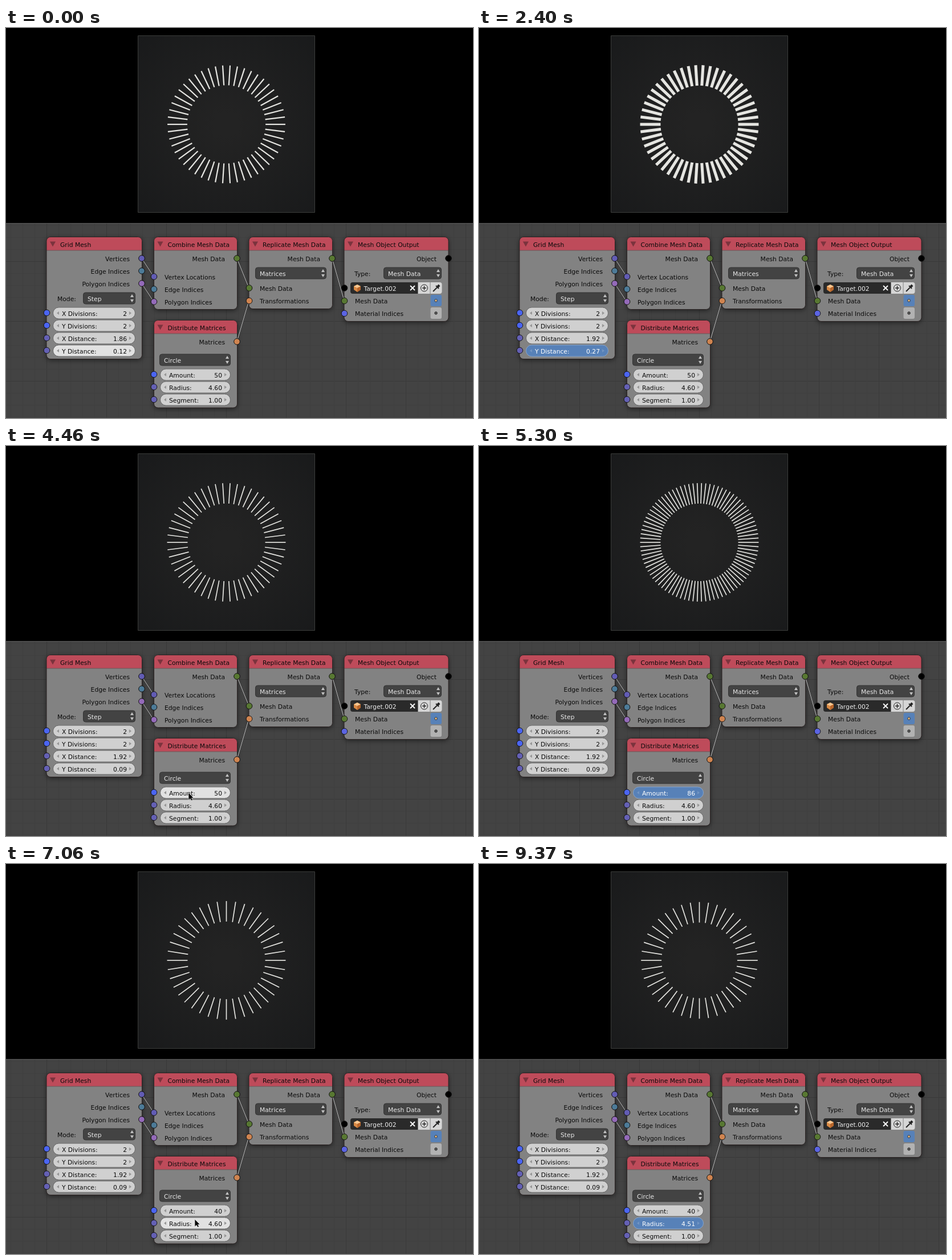
Write an HTML page with a canvas that moves like this. It is 819 by 684 pixels and loops after 9.42 s.

```html
<!DOCTYPE html>
<html lang="en">
<head>
<meta charset="utf-8">
<title>Radial mesh nodes</title>
<style>
html, body { margin: 0; width: 819px; height: 684px; overflow: hidden; background: #000; }
canvas { display: block; }
</style>
</head>
<body>
<canvas id="stage" width="819" height="684"></canvas>
<script>
const ctx = document.getElementById('stage').getContext('2d');
const LOOP = 9420, UNIT = 18.7, CX = 386.5, CY = 169;

const SOCKET = {
  vector: '#625cb4', edge: '#4d7b98', polygon: '#946ab9', mesh: '#587832',
  matrix: '#cf8450', integer: '#4b65f2', float: '#6460b4', object: '#000', indices: '#5b64e2'
};

// Keyframes: [time, value...]
const xDistance = [[340, 1.86], [600, 1.2], [1290, 3.4], [1590, 2.34], [1900, 1.92]];
const yDistance = [[2270, .12], [2700, .62], [3050, .38], [3520, .1], [3680, .1], [3730, .09]];
const amount = [[4640, 50], [4920, 72], [5150, 87], [5300, 86], [6010, 42], [6350, 40]];
const radius = [[7480, 4.6], [7920, 6.35], [8440, 5.1], [8900, 3.8], [9370, 4.51]];
const pointer = [[60, 150, 556], [110, 150, 541], [2030, 150, 541], [2220, 150, 560], [3980, 150, 560],
  [4250, 290, 623], [4430, 320, 608], [6600, 320, 608], [7040, 331, 623]];

// Which field is under the pointer or being dragged from a given time on
const focus = [[0, 'y', 'hover'], [60, '', ''], [110, 'x', 'hover'], [340, 'x', 'drag'],
  [2030, 'x', 'hover'], [2130, 'y', 'hover'], [2270, 'y', 'drag'], [3980, 'y', 'hover'],
  [4120, '', ''], [4230, 'radius', 'hover'], [4360, 'amount', 'hover'], [4620, 'amount', 'drag'],
  [6600, 'amount', 'hover'], [6950, 'radius', 'hover'], [7140, 'radius', 'drag']];

function sample(keys, t, column = 1) {
  const next = keys.findIndex(key => key[0] > t);
  if (next === 0) return keys[0][column];
  if (next < 0) return keys[keys.length - 1][column];
  const a = keys[next - 1], b = keys[next];
  return a[column] + (b[column] - a[column]) * (t - a[0]) / (b[0] - a[0]);
}

function box(x, y, w, h, r, fill, stroke) {
  ctx.beginPath();
  ctx.roundRect(x, y, w, h, r);
  ctx.fillStyle = fill;
  ctx.fill();
  if (stroke) { ctx.strokeStyle = stroke; ctx.lineWidth = 1; ctx.stroke(); }
}

function poly(points, fill, stroke) {
  ctx.beginPath();
  for (let i = 0; i < points.length; i += 2) ctx.lineTo(points[i], points[i + 1]);
  ctx.closePath();
  ctx.fillStyle = fill;
  ctx.fill();
  if (stroke) { ctx.strokeStyle = stroke; ctx.lineWidth = 1; ctx.stroke(); }
}

function line(x1, y1, x2, y2, color, width = 1) {
  ctx.beginPath();
  ctx.moveTo(x1, y1);
  ctx.lineTo(x2, y2);
  ctx.strokeStyle = color;
  ctx.lineWidth = width;
  ctx.stroke();
}

function dot(x, y, r, fill, stroke) {
  ctx.beginPath();
  ctx.arc(x, y, r, 0, 7);
  if (fill) { ctx.fillStyle = fill; ctx.fill(); }
  if (stroke) { ctx.strokeStyle = stroke; ctx.lineWidth = 1; ctx.stroke(); }
}

function label(str, x, y, color = '#0a0a0a', align = 'left') {
  ctx.font = '10.75px "DejaVu Sans", sans-serif';
  ctx.textAlign = align;
  ctx.fillStyle = color;
  ctx.fillText(str, x, y + 4.5);
}

const socket = (x, y, type) => dot(x, y, 5.3, SOCKET[type], '#111');

function output(str, x, y, type) {
  label(str, x - 21, y, '#0a0a0a', 'right');
  socket(x, y, type);
}

function input(str, x, y, type) {
  label(str, x + 18.5, y);
  socket(x, y, type);
}

function node(title, x, y, w, h) {
  ctx.save();
  ctx.shadowColor = 'rgba(0,0,0,.55)';
  ctx.shadowBlur = 8;
  ctx.shadowOffsetY = 2;
  box(x, y, w, h, 7, '#828282');
  ctx.restore();
  box(x, y, w, 23.5, [7, 7, 0, 0], '#be4b5a');
  line(x, y + 23.5, x + w, y + 23.5, '#6f5558');
  ctx.beginPath();
  ctx.roundRect(x, y, w, h, 7);
  ctx.strokeStyle = '#2c2424';
  ctx.lineWidth = 1;
  ctx.stroke();
  poly([x + 6, y + 8, x + 16, y + 8, x + 11, y + 17], '#7b333d');
  label(title, x + 24, y + 12.5);
}

function dropdown(str, x, y, w) {
  box(x + .5, y - 10, w - 1, 20, 4, '#434343', '#333');
  label(str, x + 8, y, '#e8e8e8');
  const a = x + w - 6;
  poly([a - 3, y - 2, a + 3, y - 2, a, y - 7], '#c4c4c4');
  poly([a - 3, y + 2, a + 3, y + 2, a, y + 7], '#c4c4c4');
}

function field(str, value, x, y, w, type, mode) {
  const drag = mode === 'drag';
  const fill = drag ? '#5781b8' : mode === 'hover' ? '#e2e2e2' : '#d0d0d0';
  const ink = drag ? '#fff' : '#0a0a0a', arrow = drag ? '#7395c2' : '#969696';
  box(x + .5, y - 10, w - 1, 20, 10, fill, drag ? '#86a5cd' : '#686868');
  poly([x + 11, y - 3, x + 11, y + 3, x + 7, y], arrow);
  poly([x + w - 11, y - 3, x + w - 11, y + 3, x + w - 7, y], arrow);
  label(str + ':', x + 16, y, ink);
  label(value, x + w - 15, y, ink, 'right');
  socket(x - 10.5, y - .5, type);
}

function preview(count, r, length, width) {
  const shade = ctx.createRadialGradient(CX, CY, 20, CX, CY, 220);
  shade.addColorStop(0, '#232323');
  shade.addColorStop(1, '#191a1b');
  box(231.5, 13.5, 310, 310, 0, shade, '#3b3d3b');
  ctx.fillStyle = '#e5e5e1';
  for (let i = 0; i < count; i++) {
    ctx.save();
    ctx.translate(CX, CY);
    ctx.rotate(i / count * Math.PI * 2);
    ctx.fillRect((r - length / 2) * UNIT, -width * UNIT / 2, length * UNIT, width * UNIT);
    ctx.restore();
  }
}

function editor() {
  ctx.fillStyle = '#434343';
  ctx.fillRect(0, 342, 819, 342);
  for (let i = 0; i < 40; i++) {
    const color = i % 5 === 3 ? '#393939' : '#3f3f3f';
    line(i * 21 + 8.5, 342, i * 21 + 8.5, 684, color);
    if (i < 17) line(0, i * 21 + 346.5, 819, i * 21 + 346.5, color);
  }
  line(0, 342.5, 819, 342.5, '#585858');
}

function objectPicker() {
  box(604, 446, 118, 20, [4, 0, 0, 4], '#2a2a2a');
  poly([616, 450, 622, 453, 622, 459, 616, 463, 610, 459, 610, 453], '#d98a45');
  poly([616, 450, 622, 453, 616, 456, 610, 453], '#f6c792');
  poly([616, 456, 622, 453, 622, 459, 616, 463], '#b9662b');
  label('Target.002', 627.5, 456, '#ececec');
  line(709, 452, 717, 460, '#fff', 1.8);
  line(717, 452, 709, 460, '#fff', 1.8);
  box(723, 446, 20.5, 20, 0, '#d6d6d6');
  box(744.5, 446, 20, 20, [0, 4, 4, 0], '#d6d6d6');
  dot(733.5, 456, 6, null, '#222');
  line(730, 456, 737, 456, '#222', 1.4);
  line(733.5, 452.5, 733.5, 459.5, '#222', 1.4);
  line(749, 462, 756, 455, '#222', 2);
  line(754, 452, 759, 457, '#222', 2);
  line(757, 454, 760, 451, '#222', 4);
}

function draw(t) {
  const [, name, mode] = focus.filter(f => f[0] <= t).pop();
  const modeOf = id => id === name ? mode : '';
  const x = sample(xDistance, t), y = sample(yDistance, t);
  const n = Math.round(sample(amount, t)), r = sample(radius, t);

  ctx.fillStyle = '#000';
  ctx.fillRect(0, 0, 819, 684);
  preview(n, r, x, y);
  editor();

  node('Grid Mesh', 71, 366.5, 167.5, 214);
  node('Combine Mesh Data', 259.5, 366.5, 146, 127);
  node('Distribute Matrices', 259.5, 512.5, 146, 153.5);
  node('Replicate Mesh Data', 426, 366.5, 146.5, 126);
  node('Mesh Object Output', 593, 366.5, 183, 148);

  for (const link of [[238, 404, 259, 436], [238, 448, 259, 480], [405, 404, 426, 456],
    [405, 550, 426, 478], [572, 404, 593, 478]]) {
    line(...link, '#343434', 2);
    line(...link, '#c0c0c0');
  }

  output('Vertices', 238, 404, 'vector');
  output('Edge Indices', 238, 426, 'edge');
  output('Polygon Indices', 238, 448, 'polygon');
  label('Mode:', 90, 474);
  dropdown('Step', 135, 474, 92);
  field('X Divisions', '2', 82, 500, 145, 'integer');
  field('Y Divisions', '2', 82, 522, 145, 'integer');
  field('X Distance', x.toFixed(2), 82, 544, 145, 'float', modeOf('x'));
  field('Y Distance', y.toFixed(2), 82, 566, 145, 'float', modeOf('y'));

  output('Mesh Data', 405, 404, 'mesh');
  input('Vertex Locations', 259.5, 436, 'vector');
  input('Edge Indices', 259.5, 458, 'edge');
  input('Polygon Indices', 259.5, 480, 'polygon');

  output('Matrices', 405, 550, 'matrix');
  dropdown('Circle', 269, 582, 125);
  field('Amount', String(n), 270, 608, 124, 'integer', modeOf('amount'));
  field('Radius', r.toFixed(2), 270, 630, 124, 'float', modeOf('radius'));
  field('Segment', '1.00', 270, 652, 124, 'float');

  output('Mesh Data', 572, 404, 'mesh');
  dropdown('Matrices', 437, 430, 125);
  input('Mesh Data', 426.5, 456, 'mesh');
  input('Transformations', 426.5, 478.5, 'matrix');

  output('Object', 776, 404, 'object');
  label('Type:', 611, 430);
  dropdown('Mesh Data', 662, 430, 102);
  objectPicker();
  socket(593.5, 456, 'object');
  input('Mesh Data', 593.5, 478.5, 'mesh');
  input('Material Indices', 593.5, 500.5, 'indices');
  box(744.5, 468, 19.5, 20, 3, '#5781b8');
  dot(754, 478, 2.3, '#e6b778', '#28364a');
  box(744.5, 490, 19.5, 20, 3, '#b2b2b2');
  dot(754, 500, 2.3, '#555', '#333');

  if (t >= 60 && mode !== 'drag') {
    const px = sample(pointer, t), py = sample(pointer, t, 2);
    poly([px, py, px + 9, py + 9, px + 5.5, py + 9.5, px + 7.5, py + 13,
      px + 5, py + 14, px + 3.2, py + 10.5, px, py + 13], '#080808', 'rgba(235,235,235,.7)');
  }
}

const start = performance.now();
function tick() {
  draw((performance.now() - start) % LOOP);
  requestAnimationFrame(tick);
}
tick();
</script>
</body>
</html>
```
